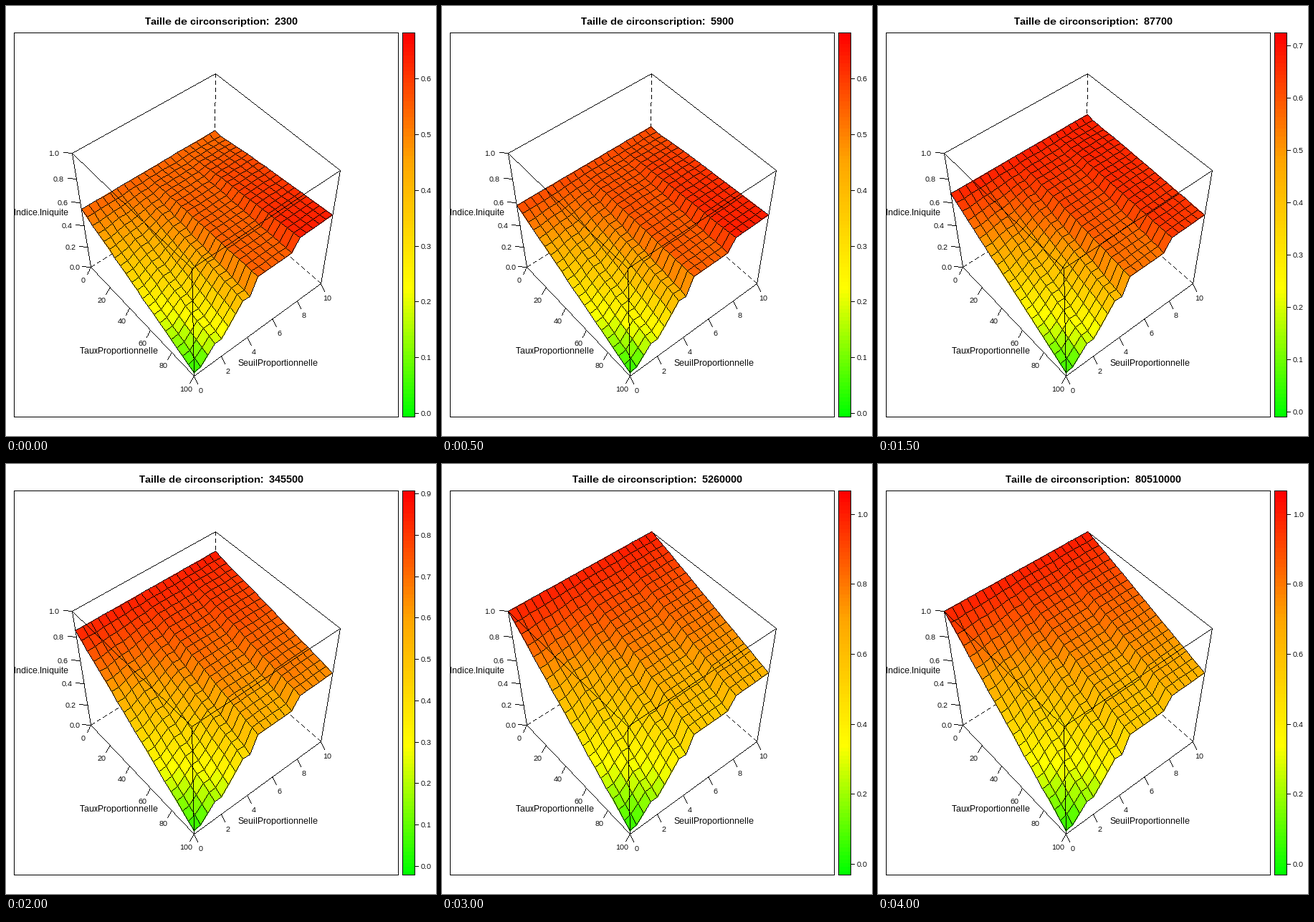
Write a matplotlib script that moves like this. It is 600x600 px and loops after 4500 ms.

```python
import numpy as np
import matplotlib.pyplot as plt
from matplotlib.animation import FuncAnimation
from matplotlib.collections import PolyCollection
from matplotlib.colors import LinearSegmentedColormap

plt.rcParams.update({
    "font.family": "Liberation Sans",
    "text.hinting": "native",
    "text.hinting_factor": 1,
    "text.kerning_factor": 10,
})

STAGE = 600
PX = 0.72  # points per pixel at 100 dpi
SIDE, CX, CY, DIST = 245, 277.3, 302, 5
COS, SIN = np.cos(np.radians(50)), np.sin(np.radians(50))

SIZES = [2300, 5900, 22800, 87700, 345500, 1342000, 5260000, 20580000, 80510000]
PEAKS = [0.546, 0.58, 0.62, 0.68, 0.85, 0.964, 1, 1, 1]  # height where Taux = 0
PROFILE = np.array([0.036, 0.047, 0.115, 0.185, 0.183, 0.255, 0.335, 0.415, 0.41]
                   + [0.546] * 6 + [0.64] * 6)           # height where Taux = 100

T, V = np.meshgrid(np.linspace(0, 1, 21), np.linspace(0, 1, 21), indexing="ij")
CMAP = LinearSegmentedColormap.from_list(
    "heat", [(0, 1, 0), (1, 1, 0), (1, 165 / 255, 0), (1, 0, 0)], N=100)
BAR_L, BAR_R, BAR_T, BAR_B = 553, 570, 37, 573


def project(t, v, h):
    """Unit cube to pixel indices, perspective seen from 50 degrees up."""
    a, b, c = t - 0.5, v - 0.5, h - 0.5
    near = a * SIN - b * COS
    scale = SIDE / (1 - (c * SIN + near * COS) / DIST)
    x = CX + (a * COS + b * SIN) * scale
    y = CY - (c * COS - near * SIN) * scale
    return np.stack([x, y], axis=-1)


def surface(peak):
    dip = 1.2 * (1 - peak) * V * T * np.exp(-T / 0.07)
    return (1 - T) * peak + T * PROFILE - dip


def corner(t, v, h):
    return project(float(t), float(v), float(h))


def ink(segments, dash=None):
    """Transparent layer with hard one-pixel black lines."""
    layer = np.zeros((STAGE, STAGE, 4), np.uint8)
    for p, q in segments:
        p, q = np.rint(p), np.rint(q)
        n = int(np.abs(q - p).max())
        x, y = np.rint(np.linspace(p, q, n + 1)).astype(int).T
        if dash:
            on, off = dash
            walked = np.linspace(0, np.hypot(*(q - p)), n + 1)
            keep = walked % (on + off) < on
            x, y = x[keep], y[keep]
        layer[y, x, 3] = 255
    return layer


fig = plt.figure(figsize=(6, 6), dpi=100, facecolor="white")
ax = fig.add_axes([0, 0, 1, 1])
ax.axis("off")


def lines(segments, z, dash=None):
    return ax.imshow(ink(segments, dash), extent=(0, STAGE, STAGE, 0), aspect="auto",
                     interpolation="nearest", zorder=z)


def label(x, y, s, size=10, ha="center", **kw):
    return ax.text(x, y, s, fontsize=size * PX, ha=ha, va="baseline", zorder=6, **kw)


def box(l, t, r, b):
    pts = [(l, t), (r, t), (r, b), (l, b)]
    return list(zip(pts, pts[1:] + pts[:1]))


# cube edges: hidden ones dashed behind the surface, the rest in front
LB, FB, RB, BB = (corner(t, v, 0) for t, v in [(0, 0), (1, 0), (1, 1), (0, 1)])
LT, FT, RT, BT = (corner(t, v, 1) for t, v in [(0, 0), (1, 0), (1, 1), (0, 1)])
lines([(BT, BB), (LB, BB), (RB, BB)], 1, dash=(6, 4))
lines([(LT, BT), (BT, RT)], 1)
front = [(LT, FT), (FT, RT), (LB, FB), (FB, RB), (LB, LT), (FB, FT), (RB, RT)]

# cube axes
ticks = []
for u in np.linspace(0, 1, 6):
    p, q, r = corner(u, 0, 0), corner(1, u, 0), corner(0, 0, u)
    ticks += [(p, p + (-5.5, 10)), (q, q + (5.5, 11)), (r, r + (-12, -1))]
    label(p[0] - 11, round(p[1] + 22), f"{100 * u:.0f}")
    label(q[0] + 9.5, round(q[1] + 24.5), f"{10 * u:.0f}")
    label(round(r[0] - 14.5 - 3 * u), round(r[1] + 4), f"{u:.1f}", ha="right")
label(158, 485, "TauxProportionnelle", 12)
label(379, 502, "SeuilProportionnelle", 12)
label(49, 292, "Indice.Iniquite", 12)
title = label(300, 26, "", 14, weight="bold")

# panel and colour bar
ax.imshow(np.linspace(1, 0, 100)[:, None], cmap=CMAP, vmin=0, vmax=1, aspect="auto",
          extent=(BAR_L + 0.5, BAR_R + 0.5, BAR_B + 0.5, BAR_T + 0.5),
          interpolation="nearest", zorder=1)
lines(front + ticks + box(11, 37, 547, 573) + box(BAR_L, BAR_T, BAR_R, BAR_B), 4)
bar_labels = [label(579, 0, "", ha="left") for _ in range(10)]

fill = PolyCollection([], edgecolors="none", linewidths=0, antialiaseds=False, zorder=2)
ax.add_collection(fill, autolim=False)
moving = lines([], 3)
ax.set_xlim(0, STAGE)
ax.set_ylim(STAGE, 0)


def quads(grid):
    """Cells of a vertex grid, farthest first."""
    cells = np.stack([grid[:-1, :-1], grid[1:, :-1], grid[1:, 1:], grid[:-1, 1:]], axis=2)
    cells = cells[:, ::-1]
    return cells.reshape((-1,) + cells.shape[2:])


def edges(grid):
    along = zip(grid[:-1].reshape(-1, 2), grid[1:].reshape(-1, 2))
    across = zip(grid[:, :-1].reshape(-1, 2), grid[:, 1:].reshape(-1, 2))
    return [*along, *across]


def update(i):
    h = surface(PEAKS[i])
    grid = project(T, V, h)
    pad = 0.07 * (h.max() - h.min())
    lo, hi = h.min() - pad, h.max() + pad
    fill.set_verts(quads(grid + 0.5))
    fill.set_facecolor(CMAP((quads(h).mean(axis=1) - lo) / (hi - lo)))
    title.set_text(f"Taille de circonscription:  {SIZES[i]}")

    values = np.arange(0, hi, 0.1 if hi < 0.95 else 0.2)
    ys = BAR_B - (values - lo) / (hi - lo) * (BAR_B - BAR_T)
    marks = [((BAR_R, y), (BAR_R + 5, y)) for y in ys]
    moving.set_data(ink(edges(grid) + marks))
    for k, text in enumerate(bar_labels):
        shown = k < len(values)
        text.set_text(f"{values[k]:.1f}" if shown else "")
        text.set_y(round(ys[k] + 4) if shown else 0)
    return [fill, moving, title, *bar_labels]


anim = FuncAnimation(fig, update, frames=len(SIZES), interval=500,
                     repeat=True, repeat_delay=0, blit=False)
plt.show()
```
